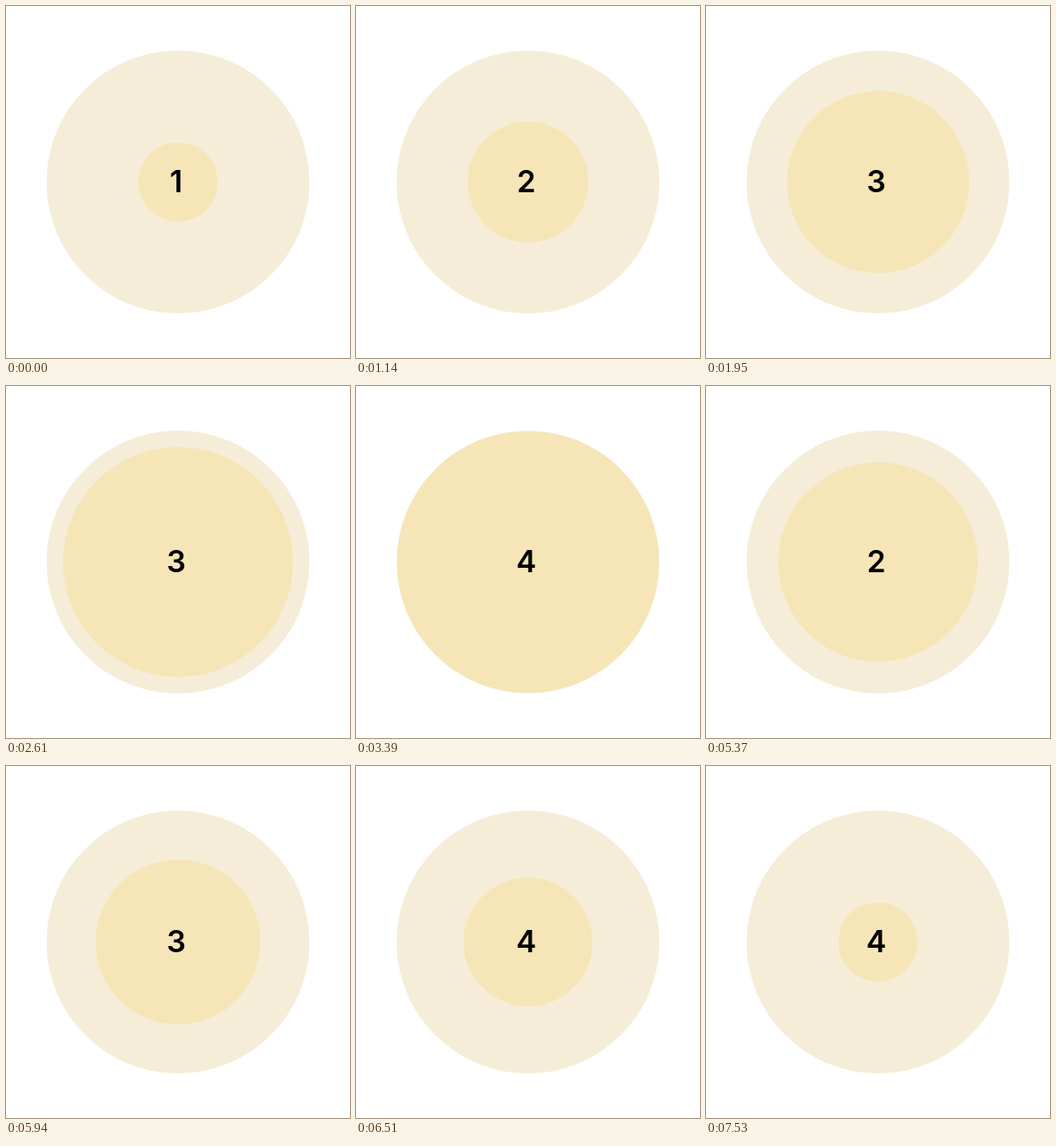
Animation, 386 px wide and 395 px high, one loop 7.65 s. Source, as an HTML page with a canvas:

```html
<!DOCTYPE html>
<html lang="en">
<head>
<meta charset="utf-8">
<title>Breathing circle</title>
<style>
html, body { margin: 0; width: 100%; height: 100%; overflow: hidden; background: #fff; }
canvas { display: block; }
</style>
</head>
<body>
<canvas id="stage" width="386" height="395"></canvas>
<script>
const ctx = document.getElementById('stage').getContext('2d');
const LOOP = 7650, PEAK = 3635, BEAT = 922;
const CX = 193, CY = 197.5, R_MIN = 44.5, R_MAX = 148;

// Exhale: time and radius
const exhale = [[PEAK, R_MAX], [4050, 144.8], [4740, 130], [5370, 112], [6510, 72.3], [7170, 51], [7540, R_MIN]];

function slope(p, i) {
  if (i === 0 || i === p.length - 1) return 0;
  const [a, b, c] = [p[i - 1], p[i], p[i + 1]];
  const h1 = b[0] - a[0], h2 = c[0] - b[0];
  return ((b[1] - a[1]) / h1 * h2 + (c[1] - b[1]) / h2 * h1) / (h1 + h2);
}

function spline(p, t) {
  const last = p.length - 1;
  if (t >= p[last][0]) return p[last][1];
  let i = 0;
  while (t >= p[i + 1][0]) i++;
  const h = p[i + 1][0] - p[i][0], u = (t - p[i][0]) / h, v = 1 - u;
  return v * v * (1 + 2 * u) * p[i][1] + u * u * (3 - 2 * u) * p[i + 1][1]
    + h * u * v * (v * slope(p, i) - u * slope(p, i + 1));
}

function radius(t) {
  if (t < 150) return R_MIN;
  if (t < PEAK) return R_MIN + (R_MAX - R_MIN) * (1 - Math.cos(Math.PI * t / PEAK)) / 2;
  return spline(exhale, t);
}

function disc(r, color) {
  ctx.fillStyle = color;
  ctx.beginPath();
  ctx.arc(CX, CY, r, 0, Math.PI * 2);
  ctx.fill();
}

function draw(t) {
  ctx.fillStyle = '#fff';
  ctx.fillRect(0, 0, 386, 395);
  disc(147.5, '#f5edd7');
  disc(radius(t), '#f6e5b6');
  const beat = Math.min(7, Math.floor(t / BEAT));
  ctx.fillStyle = '#000';
  ctx.font = '600 34px Inter, sans-serif';
  ctx.textAlign = 'center';
  ctx.fillText(beat % 4 + 1, 191, 209);
}

const start = performance.now();
function tick() {
  draw((performance.now() - start) % LOOP);
  requestAnimationFrame(tick);
}
tick();
</script>
</body>
</html>
```
